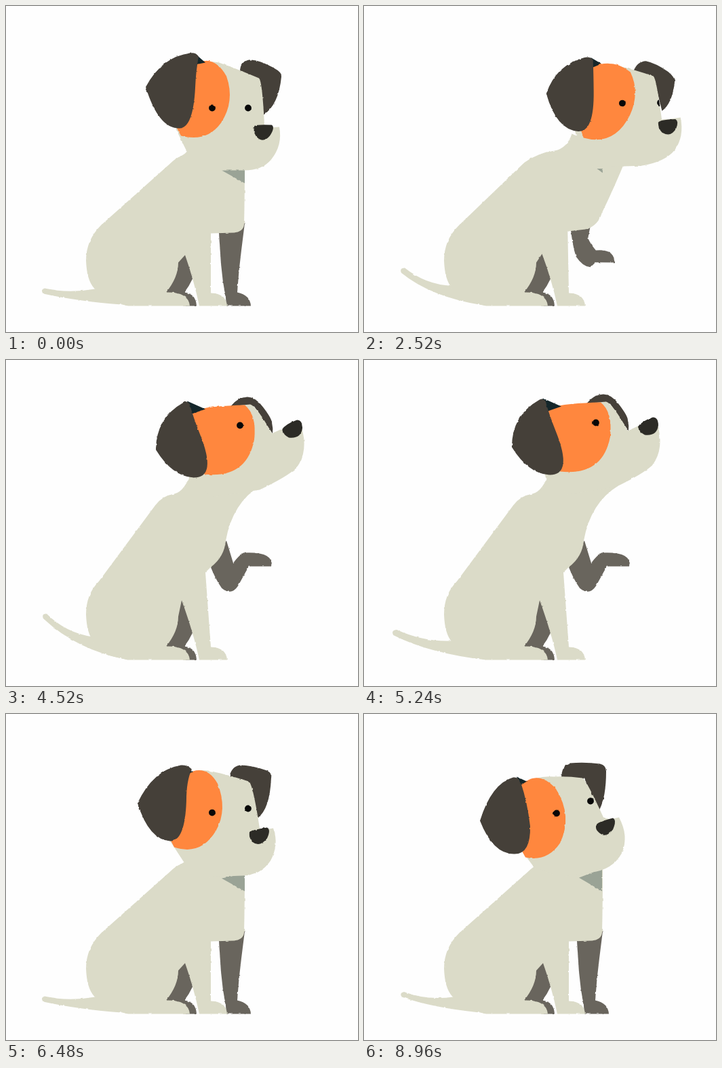
Write an HTML page with a canvas that moves like this. It is 519 by 481 pixels and loops after 9 s.

```html
<!DOCTYPE html>
<html lang="en">
<head>
<meta charset="utf-8">
<title>Sitting dog</title>
<style>
  html, body { margin: 0; width: 100%; height: 100%; overflow: hidden; background: #fefefe; }
  canvas { display: block; filter: url(#rough); }
  svg { position: absolute; width: 0; height: 0; }
</style>
</head>
<body>
<canvas id="stage" width="519" height="481"></canvas>
<svg aria-hidden="true">
  <filter id="rough" x="0" y="0" width="1" height="1" color-interpolation-filters="sRGB">
    <feTurbulence type="fractalNoise" baseFrequency="0.18" numOctaves="1" seed="4"/>
    <feDisplacementMap in="SourceGraphic" scale="2.6" xChannelSelector="R" yChannelSelector="G"/>
    <feGaussianBlur stdDeviation="0.45"/>
  </filter>
</svg>
<script>
const ctx = document.getElementById('stage').getContext('2d');
const LOOP = 9000, STEP = 40;
const FUR = '#dbdbc8', DARK = '#454039', LEG = '#69655d', ORANGE = '#ff873e';
const NUM = /-?[\d.]+/g;

// Paths of one part share their commands, so poses blend number by number.
function mix(a, b, k) {
  const to = b.match(NUM);
  let i = 0;
  return a.replace(NUM, v => (+v + (to[i++] - v) * k).toFixed(2));
}

function shift(path, dx, dy) {
  let i = 0;
  return path.replace(NUM, v => +v + (i++ % 2 ? dy : dx));
}

const mixAll = (a, b, k) =>
  Object.fromEntries(Object.keys(a).map(key => [key, mix(a[key], b[key], k)]));

const HEAD_PARTS = ['farEar', 'head', 'patch', 'inner', 'ear', 'nose', 'eyes'];
function moved(pose, dx, dy, extra) {
  const out = { ...pose };
  for (const key of HEAD_PARTS) out[key] = shift(pose[key], dx, dy);
  return Object.assign(out, extra);
}

const torso = (neck, hip, belly, front) =>
  `M${neck} L${hip} Q118,345 118,375 Q119,404 130,416 L150,435 L180,442 L271,442 ` +
  `Q269,421 236,422 Q254,400 254,378 L${belly} Q277,404 285,442 L326,442 Q325,424 302,423 L${front}Z`;

const sitBody = torso('275,200 Q270,215 258,221 Q250,224 242,232', '140,323', '264,367',
  '302,335 L335,334 Q350,333 351,322 Q352,280 352,225');
const bentBody = torso('287,195 Q286,214 272,218 Q258,222 243,237', '140,324', '264,370',
  '303,340 L338,339 Q352,336 353,322 Q357,280 357,240');
const leanBody = torso('320,200 Q315,216 295,220 Q268,223 243,238', '140,323', '264,370',
  '303,340 L340,339 Q356,336 362,322 Q385,290 392,240');
const tallBody = torso('275,160 Q264,194 248,197 Q230,200 220,214', '137,326', '259,354',
  '294,313 L302,305 Q322,290 324,266 Q334,210 375,185');

const ahead = {
  body: sitBody,
  shade: 'M318,242 L352,240 L352,261Z',
  farEar: 'M345,96 Q345,82 358,79 Q372,78 395,91 Q408,98 406,104 Q402,145 380,160 L372,108Z',
  head: 'M268,217 L250,180 L280,84 Q300,80 314,83 Q335,90 373,106 Q378,110 381,176 L386,179 L403,178 Q408,205 391,226 Q377,243 348,242 L290,242Z',
  patch: 'M280,84 Q307,71 325,103 Q338,140 317,172 Q296,201 258,191 L248,172Z',
  inner: 'M279,70 L294,83 L279,86Z',
  ear: 'M206,119 Q230,74 272,69 Q280,68 284,74 Q280,95 279,120 Q276,179 256,180 Q225,181 206,119Z',
  nose: 'M366,177 Q367,174 392,175 Q397,179 389,191 Q379,203 369,192 Q364,185 366,177Z',
  eyes: '304,150 357,150'
};
const glance = {
  body: sitBody,
  shade: 'M318,242 L352,235 L352,261Z',
  farEar: 'M329,94 Q332,77 345,75 Q362,75 385,83 Q393,87 391,95 Q389,140 371,153 L358,100Z',
  head: 'M263,219 L242,187 L266,88 Q280,81 297,83 Q320,87 358,99 Q364,102 374,168 L384,170 L394,168 Q403,192 390,216 Q376,237 350,238 L290,240Z',
  patch: 'M266,88 Q295,72 312,102 Q327,140 310,171 Q288,209 248,196 L240,180Z',
  inner: 'M263,75 L276,85 L264,90Z',
  ear: 'M194,131 Q217,82 258,75 Q268,74 274,81 Q266,98 266,128 Q264,186 243,187 Q211,186 194,131Z',
  nose: 'M359,174 Q360,171 385,167 Q391,170 385,183 Q374,197 363,188 Q358,182 359,174Z',
  eyes: '304,145 357,139'
};
const tall = {
  body: tallBody,
  shade: 'M340,215 L340,215 L340,215Z',
  farEar: 'M327,66 Q338,52 352,52 Q364,52 375,67 Q388,84 388,90 Q390,98 389,106 L362,66Z',
  head: 'M267,175 L255,120 L272,74 Q292,68 305,67 Q330,66 356,63 Q366,66 388,106 L403,99 L431,94 Q443,132 424,157 Q410,170 370,189 L300,200Z',
  patch: 'M270,72 Q300,65 348,64 Q366,78 362,115 Q351,173 288,166 L280,120Z',
  inner: 'M263,58 L290,70 L270,77Z',
  ear: 'M217,130 Q217,83 258,60 Q264,57 267,63 Q272,82 282,107 Q308,172 272,171 Q241,169 217,130Z',
  nose: 'M403,100 Q408,92 425,86 Q433,86 433,98 Q431,114 413,112 Q405,108 403,100Z',
  eyes: '341,94 402,84'
};
const low = {
  body: bentBody,
  shade: 'M345,250 L357,250 L357,259Z',
  farEar: 'M373,104 Q376,91 388,90 Q403,94 425,106 Q435,111 433,119 Q427,160 406,172 L400,118Z',
  head: 'M284,216 L275,190 L312,92 Q335,85 355,95 Q376,103 402,117 Q404,120 406,190 L415,192 L427,191 Q430,215 418,232 Q404,252 370,252 L300,250Z',
  patch: 'M312,92 Q343,79 357,108 Q370,145 350,177 Q322,218 284,203 L275,185Z',
  inner: 'M310,80 L321,88 L310,93Z',
  ear: 'M236,125 Q257,84 299,79 Q309,78 313,83 Q312,105 308,130 Q298,188 280,187 Q247,185 236,125Z',
  nose: 'M392,199 Q394,196 419,198 Q423,202 417,212 Q407,225 396,215 Q391,208 392,199Z',
  eyes: '343,161 397,164'
};
const back = {
  body: sitBody,
  shade: 'M322,242 L351,234 L351,260Z',
  farEar: 'M308,96 Q308,79 320,76 Q342,74 364,80 Q372,82 372,90 Q372,133 358,149 L342,100Z',
  head: 'M253,222 L238,203 L247,97 Q270,88 290,91 Q315,92 342,97 Q346,100 363,163 L370,165 L385,162 Q396,188 385,210 Q372,234 345,236 L290,240Z',
  patch: 'M247,98 Q273,81 296,110 Q319,150 297,190 Q276,220 243,211 L237,198Z',
  inner: 'M241,90 L253,96 L246,103Z',
  ear: 'M180,153 Q200,100 236,90 Q243,88 247,94 Q251,118 252,150 Q254,203 233,203 Q201,202 180,153Z',
  nose: 'M350,176 Q351,174 375,166 Q381,170 376,182 Q364,197 354,187 Q349,182 350,176Z',
  eyes: '294,151 347,138'
};
const upward = {
  body: sitBody,
  shade: 'M317,241 L351,228 L351,261Z',
  farEar: 'M291,95 Q291,75 304,72 Q325,70 348,73 Q357,75 357,84 Q357,122 347,141 L325,95Z',
  head: 'M251,226 L236,206 L232,103 Q255,90 280,92 Q300,91 322,94 Q328,97 353,152 L363,155 L376,152 Q391,180 380,205 Q366,230 335,233 L290,240Z',
  patch: 'M231,104 Q257,81 283,110 Q308,150 289,190 Q270,218 238,211 L232,200Z',
  inner: 'M225,92 L240,99 L230,105Z',
  ear: 'M171,157 Q188,102 220,93 Q228,92 231,100 Q241,130 245,165 Q246,207 221,206 Q190,206 171,157Z',
  nose: 'M342,164 Q343,159 367,153 Q373,156 367,170 Q356,184 346,174 Q341,170 342,164Z',
  eyes: '284,146 334,128'
};

const planted = { leg: 'M313,320 Q315,350 317,380 Q319,405 324,430 L325,442 L361,442 Q360,426 341,422 Q343,390 347,360 L352,320Z' };
const bent = { leg: 'M303,330 Q300,370 303,390 Q308,410 321,424 L327,433 L349,442 Q353,424 334,415 Q318,385 324,370 L346,325Z' };
const raised = { leg: 'M300,300 Q310,318 320,334 Q338,344 346,325 L355,297 L391,286 Q385,262 347,280 Q340,284 334,293 L323,262Z' };
const dangling = { leg: 'M300,300 Q308,322 318,336 Q332,348 342,333 L358,304 L391,304 Q396,282 350,284 Q343,288 335,299 L325,266Z' };
const pressed = { leg: shift(bent.leg, 4, 6) };

const tails = {
  sitLow: 'M131,417 Q92,424 57,416 Q50,418 55,424 Q105,435 170,440 L160,425Z',
  sitHigh: 'M131,417 Q95,418 64,393 Q55,393 58,400 Q90,428 170,440 L160,425Z',
  tallLow: 'M130,414 Q88,416 48,398 Q39,399 43,406 Q95,432 180,442 L160,425Z',
  tallHigh: 'M128,408 Q88,402 60,374 Q52,373 55,381 Q105,428 180,442 L160,425Z'
};
const hindLeg = 'M258,350 L271,375 L275,402 Q270,413 263,422 Q280,424 281,442 L262,442 L228,422 L248,376Z';

const inOut = k => k * k * (3 - 2 * k);
const easeIn = k => k * k * k;
const easeOut = k => 1 - (1 - k) ** 3;
const linear = k => k;

// Each key: time, value, easing used on the way to it.
const settled = moved(tall, 4, 2);
const poseTrack = [
  [0, ahead], [1800, glance, easeIn], [2040, glance],
  [2360, moved(low, 52, 4, { body: leanBody }), inOut],
  [2800, moved(tall, 7, -2), inOut], [3240, tall, inOut], [4520, settled, inOut],
  [4960, moved(settled, -4, -4), inOut], [5300, moved(settled, -3, -4)],
  [5520, moved(low, 35, 4, { body: leanBody }), inOut],
  [5680, low, linear], [6440, glance, easeOut], [7360, back, inOut], [8320, upward, inOut]
];
const legTrack = [
  [0, planted], [2080, planted], [2320, pressed, inOut], [2760, raised, inOut],
  [3240, raised], [4520, dangling, inOut], [5240, dangling],
  [5600, pressed, inOut], [5680, bent, linear], [5920, planted, inOut]
];
const liftTrack = [[0, { v: '0' }], [2240, { v: '0' }], [2760, { v: '1' }], [5240, { v: '1' }], [5640, { v: '0' }]];
const wagTrack = [
  [0, { v: '0' }], [1800, { v: '4.76' }, linear], [3240, { v: '8.5' }, linear], [4520, { v: '11.5' }, linear],
  [5680, { v: '14' }, linear], [7360, { v: '18.18' }, linear], [9000, { v: '22.28' }, linear]
];

function sample(track, t) {
  const i = track.findIndex(key => key[0] > t);
  if (i < 0) return track[track.length - 1][1];
  const [t0, a] = track[i - 1], [t1, b, ease = inOut] = track[i];
  return a === b ? a : mixAll(a, b, ease((t - t0) / (t1 - t0)));
}

function tailAt(t) {
  const up = 0.5 - 0.5 * Math.cos(2 * Math.PI * sample(wagTrack, t).v);
  return mix(mix(tails.sitLow, tails.sitHigh, up), mix(tails.tallLow, tails.tallHigh, up), +sample(liftTrack, t).v);
}

function fill(path, color) {
  ctx.fillStyle = color;
  ctx.fill(new Path2D(path));
}

function drawEyes(pose) {
  const [x1, y1, x2, y2] = pose.eyes.match(NUM).map(Number);
  ctx.save();
  ctx.clip(new Path2D(pose.head));
  ctx.fillStyle = '#080808';
  for (const [x, y] of [[x1, y1], [x2, y2]]) {
    ctx.beginPath();
    ctx.arc(x, y, 4.9, 0, 2 * Math.PI);
    ctx.fill();
  }
  ctx.restore();
}

function draw(t) {
  const pose = sample(poseTrack, t);
  ctx.setTransform(1, 0, 0, 1, 0, 0);
  ctx.clearRect(0, 0, 519, 481);
  ctx.translate(0, 0.5);
  fill(sample(legTrack, t).leg, LEG);
  fill(hindLeg, LEG);
  fill(tailAt(t), FUR);
  fill(pose.body, FUR);
  fill(pose.shade, '#9aa396');
  fill(pose.farEar, DARK);
  fill(pose.head, FUR);
  fill(pose.patch, ORANGE);
  fill(pose.inner, '#14262a');
  fill(pose.ear, DARK);
  drawEyes(pose);
  fill(pose.nose, '#2c2b26');
}

const start = performance.now();
function frame() {
  const t = (performance.now() - start) % LOOP;
  draw(Math.floor(t / STEP) * STEP);
  requestAnimationFrame(frame);
}
frame();
</script>
</body>
</html>
```
